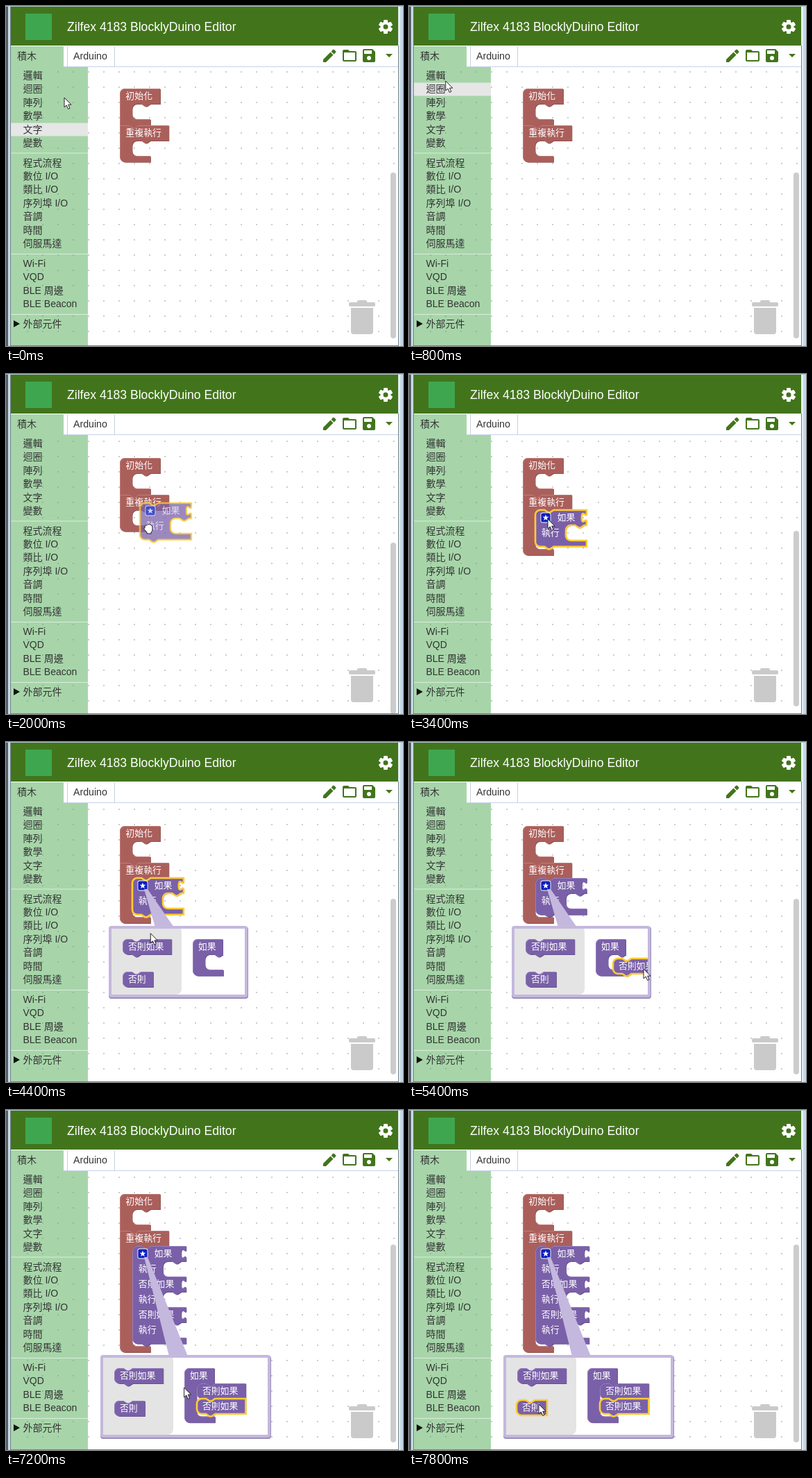
Write an HTML page with a canvas that moves like this. It is 572 px wide and 490 px high and loops after 8000 ms.

```html
<!DOCTYPE html>
<html lang="zh-Hant">
<head>
<meta charset="utf-8">
<title>Block editor</title>
<style>
html, body { margin: 0; width: 100%; height: 100%; overflow: hidden; background: #fff; }
canvas { display: block; }
</style>
</head>
<body>
<canvas id="stage" width="572" height="490"></canvas>
<script>
const ctx = document.getElementById('stage').getContext('2d');
const start = performance.now();
const STEP = 200, LOOP = 8000, SCALE = 0.88;
const FONT = '"Liberation Sans", "Noto Sans CJK TC", "Noto Sans CJK", sans-serif';
const GREEN = '#42751b';
const RED = { fill: '#ab5f5b', light: '#c18681', dark: '#8b4f4b' };
const PURPLE = { fill: '#7a60a8', light: '#9b86bf', dark: '#624c8c' };
const LAVENDER = '#c4b8de';
const DRAG_ALPHA = 0.75;

// Cursor tip: step, x, y
const CURSOR = [
  [0, 84, 132], [5, 45, 102], [6, 52, 103], [8, 142, 133], [10, 203, 217], [12, 193, 226],
  [17, 200, 209], [19, 200, 209], [23, 211, 298], [27, 338, 327], [28, 334, 325],
  [31, 194, 331], [33, 303, 376], [34, 303, 384], [39, 187, 424]
];
const MENU = [
  [100, '邏輯 迴圈 陣列 數學 文字 變數'],
  [225.5, '程式流程 數位_I/O 類比_I/O 序列埠_I/O 音調 時間 伺服馬達'],
  [371, 'Wi-Fi VQD BLE_周邊 BLE_Beacon'],
  [458, '外部元件']
];

function cursorAt(step) {
  const next = CURSOR.findIndex(key => key[0] >= step);
  if (next === 0) return CURSOR[0].slice(1);
  const [s0, x0, y0] = CURSOR[next - 1], [s1, x1, y1] = CURSOR[next];
  const u = (step - s0) / (s1 - s0);
  return [x0 + (x1 - x0) * u, y0 + (y1 - y0) * u];
}

function rect(color, x, y, w, h, radius = 0) {
  ctx.fillStyle = color;
  ctx.beginPath();
  ctx.roundRect(x, y, w, h, radius);
  ctx.fill();
}

function shape(color, path) {
  ctx.fillStyle = color;
  ctx.fill(new Path2D(path));
}

function text(str, x, baseline, size, color) {
  ctx.font = `${size}px ${FONT}`;
  ctx.fillStyle = color;
  ctx.fillText(str, x, baseline);
}

// ---- Block outlines, in unscaled block units ----
const NOTCH = 'l 6,4 3,0 6,-4', NOTCH_BACK = 'l -6,4 -3,0 -6,-4';
const TAB = 'v 5 c 0,10 -8,-8 -8,7.5 s 8,-2.5 8,7.5';
const slot = (inner, height) =>
  `H ${inner + 30} ${NOTCH_BACK} h -7 a 8,8 0 0 0 -8,8 v ${height - 16} a 8,8 0 0 0 8,8`;

function stack(body, { top = true, next = true, joined = false } = {}) {
  const foot = joined ? 'H 0 z' : 'H 8 a 8,8 0 0 1 -8,-8 z';
  return `M 0,8 a 8,8 0 0 1 8,-8 ${top ? 'H 15 ' + NOTCH : ''} ${body} ${next ? 'H 30 ' + NOTCH_BACK : ''} ${foot}`;
}

const plug = (w, h, socket = false) =>
  `M 0,0 H ${w} ${socket ? TAB : ''} V ${h} H 0 V 20 c 0,-10 -8,8 -8,-7.5 s 8,2.5 8,-7.5 z`;

const container = (width, slotHeight, options) =>
  stack(`H ${width} v 25 ${slot(20, slotHeight)} H 50 v 10`, options);

function block(x, y, outline, colors, { selected, alpha = 1, labels = [], extra } = {}) {
  const path = new Path2D(outline);
  ctx.save();
  ctx.globalAlpha = alpha;
  ctx.translate(x, y);
  ctx.scale(SCALE, SCALE);
  if (alpha === 1) {
    ctx.save();
    ctx.translate(1, 1);
    ctx.fillStyle = colors.dark;
    ctx.fill(path);
    ctx.restore();
  }
  ctx.fillStyle = colors.fill;
  ctx.fill(path);
  if (selected) {
    ctx.strokeStyle = '#fc3';
    ctx.lineWidth = 3;
    ctx.stroke(path);
  } else {
    ctx.save();
    ctx.clip(path);
    ctx.translate(0.5, 0.5);
    ctx.strokeStyle = colors.light;
    ctx.lineWidth = 1;
    ctx.stroke(path);
    ctx.restore();
  }
  for (const [str, lx, row = 0] of labels) text(str, lx, 17 + row * 25, 14.67, '#fff');
  if (extra) extra();
  ctx.restore();
}

function starIcon() {
  rect('#fff', 8.5, 4, 17, 17, 4);
  rect('#0a1fc0', 9.5, 5, 15, 15, 3);
  ctx.fillStyle = '#fff';
  ctx.beginPath();
  for (let i = 0; i < 10; i++) {
    const r = i % 2 ? 2.2 : 5.4, a = (i / 5 - 0.5) * Math.PI;
    ctx.lineTo(17 + r * Math.cos(a), 12.8 + r * Math.sin(a));
  }
  ctx.fill();
}

function ifBlock(x, y, clauses, options) {
  const w = clauses ? 88 : 84;
  let body = '';
  const labels = [['如果', 36]];
  for (let i = 0; i <= clauses; i++) {
    body += `H ${w} ${TAB} v 5 ${slot(50, 25)} `;
    if (i) labels.push(['否則如果', 10, 2 * i]);
    labels.push(['執行', 10, 2 * i + 1]);
  }
  block(x, y, stack(`${body} H ${w} v 10`), PURPLE, { labels, extra: starIcon, ...options });
}

const elseIf = (x, y, options) =>
  block(x, y, stack('H 80 v 25'), PURPLE, { labels: [['否則如果', 9]], ...options });

function dropdown(str, x, y, w) {
  rect('#cabfdd', x, y, w, 18, 4);
  text(str, x + 6, y + 14, 14, '#222');
  shape(PURPLE.fill, `M ${x + w - 11},${y + 7} h 6 l -3,4 z`);
}

function hole(x) {
  ctx.save();
  ctx.translate(x, 4);
  shape('#e4e4e4', plug(16, 26));
  ctx.restore();
}

function operator(y, width, symbol, menuWidth, secondHole) {
  block(132, y, plug(width, 34), PURPLE, { extra() {
    hole(15);
    dropdown(symbol, 36, 8, menuWidth);
    hole(secondHole);
  } });
}

// ---- Page parts ----
function header() {
  rect('#b4c4ce', 0, 0, 572, 1);
  rect(GREEN, 7, 1, 558, 56);
  rect('#3fa650', 28, 11, 38, 38);
  text('Zilfex 4183 BlocklyDuino Editor', 88, 36, 17.6, '#fff');
  ctx.save();
  ctx.translate(547, 30);
  for (let i = 0; i < 6; i++) {
    rect('#fff', -2.8, -10, 5.6, 20, 1);
    ctx.rotate(Math.PI / 3);
  }
  rect('#fff', -7.5, -7.5, 15, 15, 7.5);
  rect(GREEN, -3.5, -3.5, 7, 7, 3.5);
  ctx.restore();
}

function tabs() {
  rect('#fff', 7, 57, 558, 30);
  rect('#a7d5a9', 7, 58, 76, 29);
  rect('#c3d5ea', 83, 87, 482, 1);
  rect('#c8d0d8', 88, 58, 1, 29);
  rect('#c8d0d8', 156, 58, 1, 29);
  text('積木', 16, 77, 14, '#333');
  text('Arduino', 97, 77, 14.2, '#333');
  shape(GREEN, 'M 457,77 v 4 h 4 l 10.5,-10.5 -4,-4 z M 468.5,65.5 l 4,4 2.5,-2.5 q 1,-1 0,-2 l -2,-2 q -1,-1 -2,0 z');
  shape(GREEN, 'M 487,63 h 6 l 2,2 h 8 q 2,0 2,2 v 11 q 0,2 -2,2 h -16 q -2,0 -2,-2 v -13 q 0,-2 2,-2 z');
  rect('#fff', 487, 67, 16, 11);
  shape(GREEN, 'M 516,62 h 12 l 4,4 v 13 q 0,2 -2,2 h -14 q -2,0 -2,-2 v -15 q 0,-2 2,-2 z');
  rect('#fff', 516, 64, 11, 5);
  rect('#fff', 520, 72, 6, 6, 3);
  shape(GREEN, 'M 547,69 h 10 l -5,5 z');
}

function workspaceBackground(shift) {
  rect('#fff', 118, 87, 447, 402);
  rect('#a7d5a9', 7, 87, 111, 403);
  for (let y = 94 + shift; y < 488; y += 22)
    for (let x = 30; x < 564; x += 22) rect(x < 118 ? '#8fbb93' : '#ccc', x, y, 2, 2);
}

function sidebar(hover, selected) {
  MENU.forEach(([top, items], group) => {
    if (group) rect('#d9eedb', 7, top - 14, 111, 1);
    items.split(' ').forEach((name, i) => {
      const y = top + i * 19.4;
      const active = !group && i === selected;
      if (active) rect('#43a050', 7, y - 9, 111, 19);
      else if (!group && i === hover) rect('#e6e6e6', 7, y - 9, 111, 19);
      text(name.replace('_', ' '), 24.5, y + 5, 14, active ? '#fff' : '#333');
    });
  });
  shape('#111', 'M 11,453 l 9,5 -9,5 z');
}

function flyout(pressed) {
  rect('rgba(221,221,221,.82)', 118, 87, 132, 403, [0, 8, 8, 0]);
  ifBlock(132, 102, 0, { selected: pressed });
  operator(181, 102, '=', 31, 80);
  operator(234, 109, '且', 38, 84);
  block(132, 286, plug(43, 25, true), PURPLE, { labels: [['非', 10]] });
  block(132, 330, plug(48, 25), PURPLE, { extra: () => dropdown('真', 4, 4, 38) });
}

function mutator(step, clauses, tip) {
  const x = clauses ? 136 : 148, y = 265 + clauses * 44;
  const w = clauses ? 245 : 200, h = [103, 102, 119][clauses];
  const base = [215, 233, 235][clauses];
  shape(LAVENDER, `M 199,212 L ${base},${y + 2} H ${base + 27} L 204,212 z`);
  rect('#9c8fba', x, y + 1, w + 1, h + 1, 4);
  rect(LAVENDER, x, y, w, h, 4);
  ctx.save();
  ctx.beginPath();
  ctx.rect(x + 4, y + 4, w - 8, h - 8);
  ctx.clip();
  rect('#fff', x, y, w, h);
  rect('#e4e4e4', x, y, 105, h - 4, [0, 8, 8, 0]);
  elseIf(x + 20, y + 19, { selected: step === 23 || step === 31 });
  const grabbed = step === 39 ? 1 : 0;
  block(x + 20 - grabbed, y + 66 - grabbed, stack('H 50 v 25', { next: false }), PURPLE,
    { labels: [['否則', 9]], selected: grabbed });
  block(x + 121, y + 19, container(49, clauses ? clauses * 25 + 4 : 25, { top: false, next: false }),
    PURPLE, { labels: [['如果', 9]] });
  const dragging = (step >= 24 && step <= 27) || step === 32 || step === 33;
  for (let i = 0; i < clauses; i++)
    elseIf(x + 139, y + 41 + i * 22, { selected: i === clauses - 1 && !dragging });
  if (dragging) {
    const [dx, dy] = clauses ? [38, 3] : [44, 15];
    elseIf(tip[0] - dx, tip[1] - dy, { selected: true, alpha: step === 27 ? 1 : DRAG_ALPHA });
  }
  ctx.restore();
}

function scrollbarAndTrash(top, bottom) {
  rect('#ccc', 554, top, 8, bottom - top, 4);
  rect('#cacaca', 494, 427, 38, 6, 2);
  rect('#cacaca', 506, 424, 14, 5, 2);
  rect('#cacaca', 497, 435, 32, 38, [0, 0, 4, 4]);
}

function windowFrame() {
  rect('#cddbe7', 0, 0, 7, 490);
  rect('#53616b', 0, 0, 3, 490);
  rect('#718089', 6, 1, 1, 489);
  rect('#e6eff6', 565, 0, 7, 490);
  rect('#c3d8e8', 568, 0, 4, 490);
  rect('#72828c', 565, 57, 1, 433);
  rect('#77858d', 7, 489, 558, 1);
}

function drawCursor([x, y], hand) {
  ctx.save();
  ctx.translate(x, y);
  const path = new Path2D(hand
    ? 'M -3,3 q 0,-3 3,-2 q 1,-2 3,-1 q 2,-1 3,1 q 2,0 2,3 v 3 q 0,3 -2,4 v 2 h -6 v -2 l -4,-4 q -1,-2 1,-2 z'
    : 'M 0,0 V 14 L 3.2,11 5.6,16.5 8,15.4 5.7,10.2 H 10 z');
  ctx.fillStyle = '#fff';
  ctx.fill(path);
  ctx.strokeStyle = '#222';
  ctx.lineWidth = 1;
  ctx.stroke(path);
  ctx.restore();
}

function draw(step) {
  const tip = cursorAt(step);
  const draggingIf = step >= 9 && step < 12, placed = step >= 12;
  const clauses = step < 28 ? 0 : step < 34 ? 1 : 2;
  const shift = step < 9 ? 0 : 2;
  const scrollTop = step < 9 ? 240 : step < 12 ? 243 : [226, 207, 194][clauses];

  ctx.clearRect(0, 0, 572, 490);
  workspaceBackground(shift);
  scrollbarAndTrash(scrollTop, draggingIf ? 490 : 479);
  block(164, 119 + shift, container(66, 25, { top: false, joined: true }), RED, { labels: [['初始化', 9.5]] });
  block(164, 172 + shift,
    `M 0,0 H 15 ${NOTCH} H 80 v 25 ${slot(20, placed ? 64 + clauses * 50 : 25)} H 50 v 10 H 8 a 8,8 0 0 1 -8,-8 z`,
    RED, { labels: [['重複執行', 9.5]] });
  if (placed) ifBlock(182, 196, clauses, { selected: step < 23 });
  if (step >= 5 && step < 9) flyout(step === 8);
  sidebar(step < 5 ? Math.round(4 - step * 0.8) : -1, step >= 5 && step < 9 ? 0 : -1);
  if (draggingIf) ifBlock(tip[0] - 10, tip[1] - 31, 0, { selected: true, alpha: DRAG_ALPHA });
  if (step >= 19) mutator(step, clauses, tip);
  windowFrame();
  header();
  tabs();
  drawCursor(tip, draggingIf || (step >= 24 && step < 27) || step === 32 || step === 33);
}

function tick() {
  draw(Math.floor(((performance.now() - start) % LOOP) / STEP));
  requestAnimationFrame(tick);
}
tick();
</script>
</body>
</html>
```
